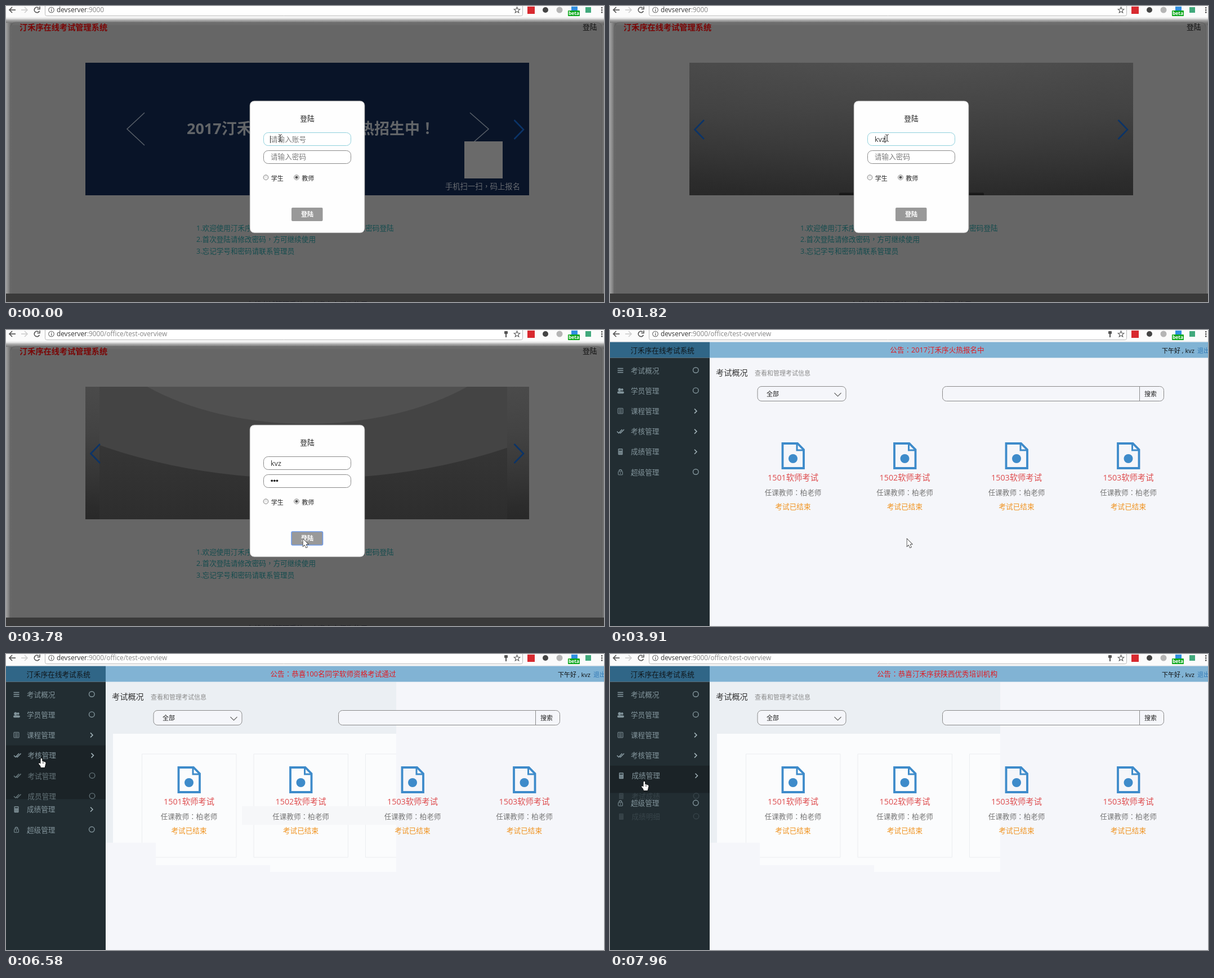
Write an HTML page with a canvas that moves like this. It is 1062x527 px and loops after 8 s.

```html
<!DOCTYPE html>
<html lang="zh">
<head>
<meta charset="utf-8">
<title>在线考试</title>
<style>
html, body { margin: 0; width: 100%; height: 100%; overflow: hidden; background: #fff; }
canvas { display: block; }
</style>
</head>
<body>
<canvas id="stage" width="1062" height="527"></canvas>
<script>
const g = document.getElementById('stage').getContext('2d');
const LOOP = 8000, SIDE = 177, BRAND = '汀禾序', USER = 'kvz';
const FONT = '"Open Sans", "Noto Sans CJK SC", "Noto Sans CJK", sans-serif';
const MARK_FONT = '"Noto Sans CJK TC", "Noto Sans CJK", sans-serif';

const clamp = v => Math.max(0, Math.min(1, v));
const ramp = (t, a, d) => clamp((t - a) / d);
const ease = v => v * v * (3 - 2 * v);
const at = (keys, t) => keys.reduce((best, k) => (t >= k[0] ? k : best), keys[0]);

function rect(x, y, w, h, color) {
  g.fillStyle = color;
  g.fillRect(x, y, w, h);
}
// Full-width punctuation sits centred in its cell, hence the second font.
function text(s, x, cy, size, color, align = 'left', weight = 400) {
  const setFont = family => { g.font = `${weight} ${size}px ${family}`; };
  setFont(FONT);
  const width = g.measureText(s).width;
  let pen = x - width * { left: 0, center: 0.5, right: 1 }[align];
  g.fillStyle = color;
  for (const run of s.split(/([：，！])/)) {
    setFont(/[：，！]/.test(run) ? MARK_FONT : FONT);
    g.fillText(run, pen, cy + size * 0.37);
    pen += g.measureText(run).width;
  }
  return width;
}
function line(pts, color, width = 1, close = false) {
  g.beginPath();
  pts.forEach(([x, y]) => g.lineTo(x, y));
  if (close) g.closePath();
  g.strokeStyle = color;
  g.lineWidth = width;
  g.stroke();
}
function box(x, y, w, h, r, fill, stroke, width = 1) {
  g.beginPath();
  g.roundRect(x, y, w, h, r);
  if (fill) { g.fillStyle = fill; g.fill(); }
  if (stroke) { g.strokeStyle = stroke; g.lineWidth = width; g.stroke(); }
}
function disc(x, y, r, fill, stroke, width = 1) {
  g.beginPath();
  g.arc(x, y, r, 0, Math.PI * 2);
  if (fill) { g.fillStyle = fill; g.fill(); }
  if (stroke) { g.strokeStyle = stroke; g.lineWidth = width; g.stroke(); }
}
function clipped(x, y, w, h, draw) {
  g.save();
  g.beginPath();
  g.rect(x, y, w, h);
  g.clip();
  draw();
  g.restore();
}
function fade(x0, y0, x1, y1, ...colors) {
  const f = g.createLinearGradient(x0, y0, x1, y1);
  colors.forEach((c, i) => f.addColorStop(i / (colors.length - 1), c));
  return f;
}

// ---- browser bar ----
function browserBar(t) {
  const moved = t >= 3650;
  rect(0, 0, 1062, 21, '#fbfbfb');
  rect(0, 20, 1062, 1, '#eeeeee');
  for (const [x, d, c] of [[11, 1, '#555'], [33, -1, '#cfcfcf']]) {
    line([[x - 5 * d, 7], [x + 6 * d, 7]], c, 1.7);
    line([[x, 2], [x - 5 * d, 7], [x, 12]], c, 1.7);
  }
  g.beginPath();
  g.arc(55, 7, 4.7, 0.4, 5.4);
  g.strokeStyle = '#555';
  g.lineWidth = 1.7;
  g.stroke();
  line([[60, 1], [60, 5.5], [55.5, 5.5]], '#555', 1.6);
  box(69.5, -6, 848, 23.5, 3, '#fff', '#b9b9b9');
  disc(80.5, 7, 4.8, null, '#666', 1.1);
  rect(80, 6, 1.2, 4, '#666');
  rect(80, 4, 1.2, 1.2, '#666');
  const w = text('devserver', 90, 7, 11.8, '#333');
  text(':9000' + (moved ? '/office/test-overview' : ''), 90 + w, 7, 11.8, '#858585');
  if (moved) {
    box(885, 2, 6, 5, 1, '#555');
    rect(887, 7, 2, 6, '#555');
  }
  const star = [];
  for (let i = 0; i < 10; i++) {
    const a = i * Math.PI / 5 - Math.PI / 2, r = i % 2 ? 2.4 : 5.5;
    star.push([907.5 + r * Math.cos(a), 7.5 + r * Math.sin(a)]);
  }
  line(star, '#555', 1.1, true);
  rect(926, 1, 13, 13, '#d8292f');
  disc(958, 7, 5, '#444');
  disc(983, 7, 5.5, '#b5b5b5');
  rect(1004, 1, 11, 9, '#2f8fe0');
  box(998, 8, 21, 10, 1, '#0ca81c');
  text('beta', 1008.5, 12.8, 8.5, '#fff', 'center', 700);
  rect(1029, 2, 10, 10, '#41a97c');
  for (const y of [2, 6, 10]) rect(1057, y, 2.5, 2.5, '#555');
}

// ---- login page ----
function blueSlide() {
  rect(141, 101, 788, 236, '#091428');
  text('2017' + BRAND + '课程', 321, 218, 27, '#626568', 'left', 700);
  text('火热招生中！', 762, 218, 27, '#626568', 'right', 700);
  line([[246, 190], [215, 219], [246, 248]], '#596069', 1.5);
  line([[824, 190], [857, 219], [824, 248]], '#596069', 1.5);
  rect(814, 241, 68, 66, '#6a6a6a');
  text('手机扫一扫，码上报名', 780, 321, 13.3, '#666a70', 'left', 500);
}
function greySlide() {
  rect(141, 101, 788, 236, fade(0, 101, 0, 337, '#4d4d4d', '#454545', '#393939', '#2b2b2b'));
  g.save();
  g.translate(535, -60);
  g.scale(2, 1);
  const s = g.createRadialGradient(0, 0, 150, 0, 0, 420);
  s.addColorStop(0, 'rgba(84,84,84,.5)');
  s.addColorStop(0.6, 'rgba(60,60,60,.25)');
  s.addColorStop(1, 'rgba(35,35,35,.3)');
  rect(-197, 161, 394, 236, s);
  g.restore();
}
function bandedSlide(alpha) {
  clipped(166, 101, 724, 236, () => {
    g.globalAlpha = alpha;
    rect(141, 101, 788, 236, fade(0, 200, 0, 337, '#363636', '#2d2d2d'));
    for (const [rx, ry, c] of [[636, 325, '#444444'], [403, 227, '#505050']]) {
      g.beginPath();
      g.ellipse(535, -60, rx, ry, 0, 0, Math.PI * 2);
      g.fillStyle = c;
      g.fill();
    }
  });
}
function carousel(t) {
  const shift = 788 * ease(ramp(t, 1000, 510));
  clipped(141, 101, 788, 236, () => {
    g.translate(-shift, 0);
    if (shift < 788) blueSlide();
    g.translate(788, 0);
    if (shift > 0) greySlide();
    g.translate(shift - 788, 0);
    if (t >= 3250) bandedSlide(ramp(t, 3250, 250));
    if (t >= 1820 && t < 2500) box(407, 332.5, 257, 6, 2, '#191919');
    const blue = '#0b3468';
    if (t >= 1000) line([[167, 203], [150.5, 220], [167, 237]], blue, 2.6);
    line([[902.5, 203], [919, 220], [902.5, 237]], blue, 2.6);
  });
}
function modal(t) {
  const pass = t >= 2100, done = t >= 3400;
  box(433, 169, 204, 235, 8, '#fefefe', '#8a8a8a', 0.8);
  text('登陆', 535, 200, 12.7, '#222', 'center');
  const border = on => on ? '#8fd0dc' : '#8a8a8a';
  box(457.5, 225.5, 155, 23, 8, '#fff', border(!pass));
  box(457.5, 257.5, 155, 23, 8, '#fff', border(pass && !done));

  const typed = USER.slice(0, at([[0, 0], [830, 1], [1000, 2], [1170, 3]], t)[1]);
  const w = typed ? text(typed, 470, 237, 12.6, '#333') : 0;
  if (!typed) text('请输入账号', 470, 237, 12.6, '#7c7c7c');
  const dots = at([[0, 0], [2260, 1], [2380, 2], [2500, 3]], t)[1];
  if (!dots) text('请输入密码', 470, 268.5, 12.6, '#7c7c7c');
  for (let i = 0; i < dots; i++) disc(472.2 + i * 4.6, 268.3, 1.9, '#222');

  if (!pass && (t < 560 || t >= 830)) rect(469 + w, 231, 1, 13, '#222');
  if (pass && !done) rect(470 + dots * 4.8, 262, 1, 13, '#222');

  [['学生', 461.5, false], ['教师', 516, true]].forEach(([label, x, on]) => {
    disc(x, 305.2, 4.4, fade(0, 300, 0, 310, '#e2e2e2', '#fafafa'), '#888');
    if (on) disc(x, 305.2, 2.4, '#555');
    text(label, x + 9.2, 306.8, 11, '#222');
  });
  box(507, 359, 55.5, 24, 2, '#999', done ? '#6f9ae6' : null, 1.6);
  text('登陆', 535, 371, 11, '#fff', 'center', 700);
}
function loginPage(t) {
  rect(0, 21, 1062, 506, '#666');
  rect(0, 21, 1062, 14, fade(0, 21, 0, 35, '#f7f7f7', '#a5a5a5', '#727272', '#666'));
  rect(0, 30, 10, 482, fade(0, 0, 10, 0, '#a2a2a2', '#808080', '#666'));
  rect(1056, 34, 6, 478, fade(1056, 0, 1062, 0, '#666', '#777'));
  box(7.5, 29.5, 1051, 520, 9, null, 'rgba(70,70,70,.25)', 2);
  text(BRAND + '在线考试管理系统', 24, 38, 14.2, '#7a0606', 'left', 700);
  text('登陆', 1024, 37, 12.8, '#111');
  carousel(t);
  [`1.欢迎使用${BRAND}在线考试管理系统，请先使用学号和密码登陆`,
   '2.首次登陆请修改密码，方可继续使用',
   '3.忘记学号和密码请联系管理员'
  ].forEach((s, i) => text(s, 338, 395 + i * 20.6, 12.6, '#154c4e'));
  rect(0, 512, 1062, 15, '#3a3a3a');
  text('在线考试管理系统，欢迎广大师生使用', 535, 531, 12.6, '#23232b', 'center');
  modal(t);
}

// ---- dashboard ----
const icons = {
  bars(x, y, c) { for (const d of [-3.5, 0, 3.5]) rect(x - 5, y + d - 0.8, 10, 1.6, c); },
  users(x, y, c) {
    for (const [dx, r] of [[3, 2.1], [-1.5, 2.7]]) {
      disc(x + dx, y - 2, r, c);
      box(x + dx - r - 1.3, y + 1, r * 2 + 2.6, 4, 2, c);
    }
  },
  list(x, y, c) {
    box(x - 4.5, y - 5, 9, 9.5, 0.5, null, c);
    for (const d of [-2.5, 0, 2.5]) rect(x - 2.8, y + d - 0.6, 5.6, 1, c);
  },
  checks(x, y, c) {
    line([[x - 6, y], [x - 3, y + 3], [x + 3, y - 3.5]], c, 1.6);
    line([[x - 1.5, y + 1.5], [x, y + 3], [x + 6.5, y - 3.5]], c, 1.6);
  },
  calc(x, y, c) {
    box(x - 4, y - 5.5, 8, 11, 1, c);
    rect(x - 2.8, y - 4, 5.6, 2, '#222d32');
    for (let i = 0; i < 6; i++) rect(x - 2.6 + i % 3 * 2, y + (i < 3 ? 0 : 2.5), 1, 1, '#222d32');
  },
  lock(x, y, c) {
    g.beginPath();
    g.arc(x, y - 2, 2.4, Math.PI, 0);
    g.strokeStyle = c;
    g.lineWidth = 1.2;
    g.stroke();
    box(x - 3.8, y - 1.2, 7.6, 6, 0.5, null, c);
    rect(x - 0.6, y + 0.8, 1.2, 2, c);
  }
};
const MENU = [
  { name: '考试概况', icon: 'bars' },
  { name: '学员管理', icon: 'users' },
  { name: '课程管理', icon: 'list', subs: ['课程列表', '章节管理'], hover: 5000, open: 5150, leave: 5980 },
  { name: '考核管理', icon: 'checks', subs: ['考试管理', '成员管理'], hover: 6130, open: 6290, leave: 6980 },
  { name: '成绩管理', icon: 'calc', subs: ['考试成绩', '成绩明细'], hover: 7540, open: 7900, leave: 9000 },
  { name: '超级管理', icon: 'lock' }
];
function menuRow(name, icon, y, dx, arrow) {
  const c = '#82949b';
  icons[icon](18.5 + dx, y, c);
  text(name, 37 + dx, y, 12.6, c);
  if (arrow) line([[150 + dx, y - 4], [154 + dx, y], [150 + dx, y + 4]], '#a3b4ba', 1.5);
  else disc(152.3 + dx * 0.5, y - 0.5, 4.8, null, c, 1.4);
}
function sidebar(t) {
  rect(0, 49.5, SIDE, 478, '#222d32');
  let y = 72;
  for (const m of MENU) {
    const on = m.subs && t >= m.hover && t < m.leave;
    const open = m.subs ? ramp(t, m.open, 350) * (1 - ramp(t, m.leave, 280)) : 0;
    if (on || open) rect(0, y - 18, SIDE, 36 + 72 * open, '#1b2327');
    menuRow(m.name, m.icon, y, on ? 1.5 : 0, !!m.subs);
    if (open) {
      g.globalAlpha = 0.78 * open ** 0.7;
      m.subs.forEach((s, i) => menuRow(s, m.icon, y + 36.3 * (i + 1), 1.5, false));
      g.globalAlpha = 1;
    }
    y += 36.2 + 72 * open;
  }
}
function panel() {
  rect(SIDE, 49, 520, 341, '#ebeff3');
  rect(190, 142, 506, 248, '#fbfcfd');
  for (let i = 0; i < 3; i++) box(241.5 + i * 198.5, 178, 167.5, 184, 0, null, '#ebedf0');
}
function card(i) {
  const x = 325 + i * 198.5, blue = '#3e8bca';
  line([[x - 18.5, 202], [x + 8, 202], [x + 19, 213], [x + 19, 246], [x - 18.5, 246]], blue, 3.8, true);
  line([[x + 7, 202], [x + 7, 214], [x + 19, 214]], blue, 3);
  disc(x, 229, 8, blue);
  text(`150${Math.min(i + 1, 3)}软师考试`, x, 263, 14.3, '#de4b4d', 'center');
  text('任课教师：柏老师', x, 289.5, 12.6, '#777', 'center');
  text('考试已结束', x, 314.5, 12.6, '#f0921e', 'center');
}
function dashboard(t) {
  const page = '#f5f6fa';
  rect(0, 21, 1062, 506, page);
  // lighter areas refreshed along the pointer's way
  [[4060, 469, 224, 338], [4200, 266, 204, 326], [4330, SIDE, 90, 286]].forEach(([from, x, w, h]) => {
    if (t >= from) clipped(x, 50, w, h, panel);
  });
  if (t >= 4470 && t < 7540) {
    const x = t < 5260 ? 182 : 419;
    rect(x, 271, 693 - x, 33, '#f6f7f9');
  }
  rect(0, 21.5, SIDE, 28, '#306687');
  rect(SIDE, 21.5, 1062 - SIDE, 28, '#81b3d4');
  text(BRAND + '在线考试系统', 36.5, 36.5, 12.6, '#10161a');
  const notice = at([
    [0, '2017' + BRAND + '火热报名中'],
    [4060, '恭喜100名同学软师资格考试通过'],
    [7540, '恭喜' + BRAND + '获陕西优秀培训机构']
  ], t)[1];
  text('公告：' + notice, 581, 35, 12.6, '#e01b22', 'center');
  text('下午好 , ' + USER, 980, 36.5, 11, '#111');
  text('退出', 1043, 36.5, 11, '#337ab7');
  sidebar(t);

  text('考试概况', 188, 75.5, 14.2, '#333');
  text('查看和管理考试信息', 257, 76.5, 11, '#8a8a8a');
  box(262, 100.5, 157, 26, 7, page, '#8a8a8a');
  text('全部', 278, 114, 11, '#222');
  line([[398.5, 112], [404.5, 118], [410.5, 112]], '#666', 1.1);
  box(590.5, 100.5, 393, 26, 7, page, '#8a8a8a');
  line([[940.5, 101], [940.5, 126]], '#8a8a8a');
  text('搜索', 949, 114, 11, '#222');
  for (let i = 0; i < 4; i++) card(i);
}

// ---- pointer ----
const pointers = {
  none() {},
  beam(x, y) {
    line([[x, y - 5], [x, y + 5]], '#333', 1.2);
    line([[x - 3, y - 6.5], [x, y - 5], [x + 3, y - 6.5]], '#333');
    line([[x - 3, y + 6.5], [x, y + 5], [x + 3, y + 6.5]], '#333');
  },
  arrow(x, y) {
    const pts = [[0, 0], [0, 13], [3, 10.3], [5.2, 15.5], [7.4, 14.6], [5.2, 9.6], [9, 9.2]];
    const p = pts.map(([a, b]) => [x + a, y + b]);
    line(p, '#111', 1.3, true);
    g.fillStyle = '#fff';
    g.fill();
  },
  hand(x, y) {
    const pts = [[-1.3, 0], [1, 0], [1.3, 5], [6.5, 6.3], [7.6, 8], [6.5, 12.5], [5.6, 16],
                 [-1, 16], [-2, 13], [-5, 9.5], [-4, 8], [-1.6, 9.6]];
    const p = pts.map(([a, b]) => [x + a, y + b]);
    line(p, '#111', 1.3, true);
    g.fillStyle = '#fff';
    g.fill();
    for (const d of [2, 4]) line([[x + d, y + 6.5], [x + d, y + 9]], '#333', 0.8);
  }
};
const PATH = [
  [0, 'beam', 487, 235], [280, 'none', 0, 0], [1820, 'beam', 492, 235],
  [1960, 'beam', 491, 252], [2100, 'beam', 490, 267], [2260, 'none', 0, 0],
  [2900, 'beam', 492, 270], [3030, 'arrow', 505, 315], [3150, 'arrow', 521, 352],
  [3280, 'arrow', 527.5, 372], [4060, 'arrow', 470, 359], [4200, 'arrow', 267, 320],
  [4330, 'arrow', 183, 288], [4470, 'hand', 110, 232], [4600, 'hand', 70, 180],
  [4730, 'hand', 54, 150], [4870, 'hand', 50, 137], [5980, 'hand', 56, 112],
  [6130, 'hand', 60, 170], [6290, 'hand', 63, 186], [6980, 'hand', 100, 196],
  [7120, 'arrow', 190, 210], [7260, 'arrow', 186, 222], [7540, 'hand', 61, 227]
];

const start = performance.now();
function frame() {
  const t = (performance.now() - start) % LOOP;
  g.globalAlpha = 1;
  if (t < 3910) loginPage(t);
  else dashboard(t);
  browserBar(t);
  const [, kind, x, y] = at(PATH, t);
  pointers[kind](x, y);
  requestAnimationFrame(frame);
}
frame();
</script>
</body>
</html>
```
